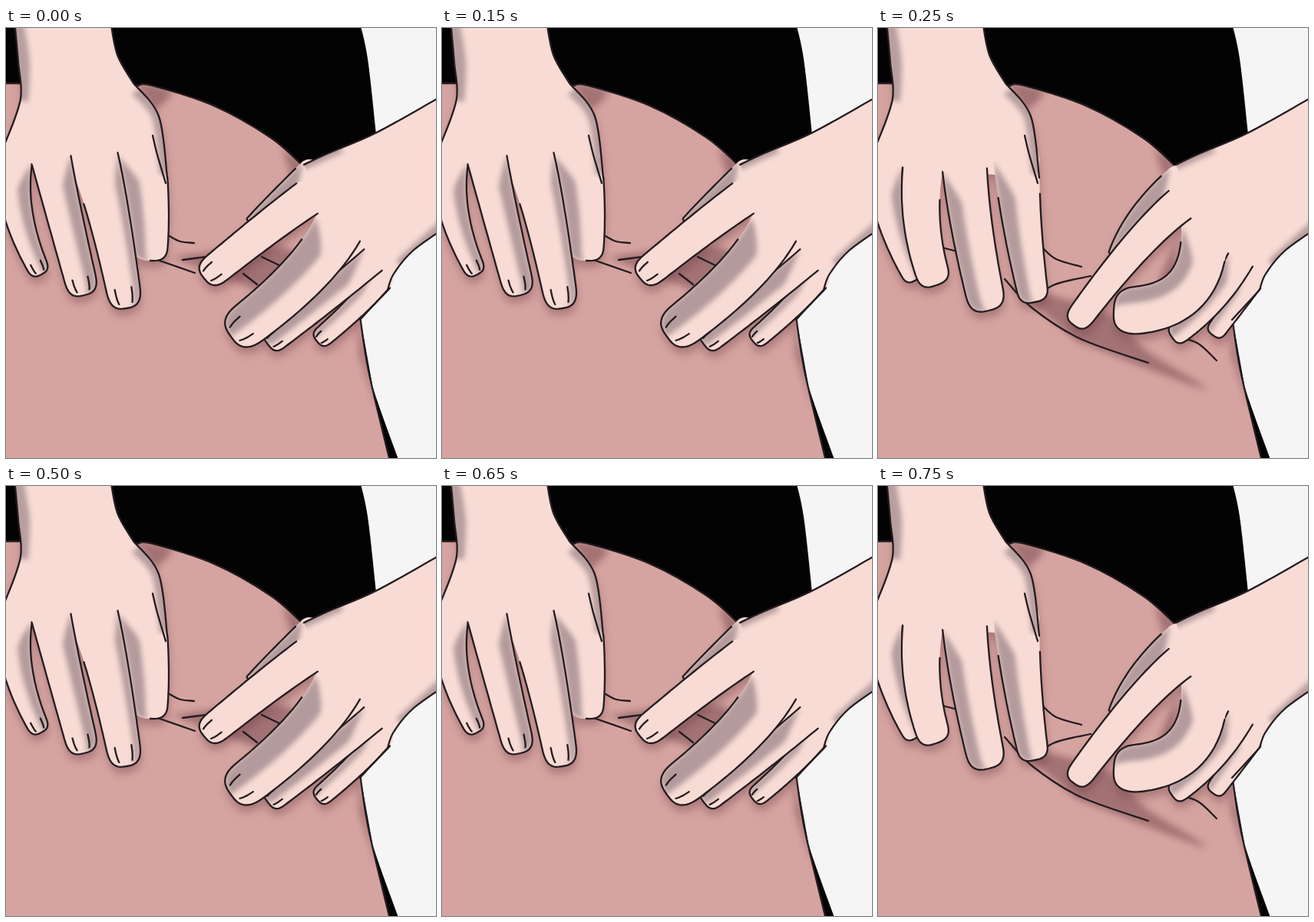
These frames come from a looping animation (560x560 px, 1000 ms). An HTML page:

```html
<!DOCTYPE html>
<html lang="en">
<head>
<meta charset="utf-8">
<title>Skin pinch</title>
<style>
  html, body { margin: 0; width: 100%; height: 100%; overflow: hidden; background: #f5f5f5; }
  svg { display: block; width: 560px; height: 560px; }
  .line { fill: none; stroke: #241c1f; stroke-width: 2.3; stroke-linecap: round; stroke-linejoin: round; }
  .skin { fill: #f7dbd4; }
  .belly { fill: #d6a4a0; }
  .cloth { fill: #030303; }
  .shade { fill: #6b5560; opacity: .48; filter: blur(3px); }
  .rim { fill: none; stroke: #6b5560; stroke-width: 20; opacity: .45; filter: blur(3px); }
  .fold { fill: #64363f; opacity: .45; filter: blur(5px); }
  .cast { fill: #6d3c44; opacity: .4; filter: blur(6px); }
</style>
</head>
<body>
<svg id="stage" viewBox="0 0 560 560"></svg>
<script>
const parse = text => text.trim().split(/\s+/).map(p => p.split(',').map(Number));

// Smooth path through "x,y" points; "|" marks a sharp corner.
function curve(text) {
  let last, d = '';
  for (const part of text.split('|')) {
    const pts = parse(part);
    if (last) pts.unshift(last); else d = 'M' + pts[0];
    for (let i = 0; i < pts.length - 1; i++) {
      const b = pts[i], c = pts[i + 1], a = pts[i - 1] || b, e = pts[i + 2] || c;
      const c1 = b.map((v, k) => v + (c[k] - a[k]) / 6);
      const c2 = c.map((v, k) => v - (e[k] - b[k]) / 6);
      d += `C${c1} ${c2} ${c}`;
    }
    last = pts[pts.length - 1];
  }
  return d;
}
const draw = (cls, d) => `<path class="${cls}" d="${d}"/>`;
const curves = (cls, list = []) => list.map(text => draw(cls, curve(text))).join('');

let clips = 0;
function clipped(d, content) {
  const id = 'clip' + clips++;
  return `<clipPath id="${id}"><path d="${d}"/></clipPath><g clip-path="url(#${id})">${content}</g>`;
}

// Tapered finger along a bend from root through middle to tip.
// shade: shaded share of the width, negative for the other side.
// from: where along the finger each side line begins.
function finger(spine, w0, w1, shade = 0, from = [0, 0]) {
  const [a, m, b] = parse(spine);
  const c = m.map((v, k) => 2 * v - (a[k] + b[k]) / 2);
  const dist = (p, q) => Math.hypot(p[0] - q[0], p[1] - q[1]);
  const round = w1 / 2 / (dist(a, m) + dist(m, b));

  function at(t, side) {
    const [x, y] = a.map((v, k) => (1 - t) ** 2 * v + 2 * t * (1 - t) * c[k] + t * t * b[k]);
    const [dx, dy] = a.map((v, k) => (1 - t) * (c[k] - v) + t * (b[k] - c[k]));
    const s = Math.max(0, 1 - (1 - t) / round);
    const half = (w0 + (w1 - w0) * t) / 2 * Math.cbrt(1 - s ** 3);
    const k = side * half / Math.hypot(dx, dy);
    return [(x - dy * k).toFixed(1), (y + dx * k).toFixed(1)];
  }
  // Steps crowd toward the end, where the tip turns.
  const edge = (side, t0 = 0, t1 = 1, n = 36) => Array.from({ length: n + 1 }, (_, i) =>
    at(t0 + (t1 - t0) * (1 - (1 - i / n) ** 2), typeof side === 'function' ? side(t0 + (t1 - t0) * (1 - (1 - i / n) ** 2)) : side));
  const open = pts => 'M' + pts.join('L');

  const sign = Math.sign(shade);
  const inner = t => sign * (1 - 2 * Math.abs(shade) * Math.min(1, 4 * t));
  const outline = open([...edge(1), ...edge(-1).reverse()]);
  const root = `<circle class="skin" cx="${a[0]}" cy="${a[1]}" r="${w0 / 2}"/>`;
  const band = shade ? clipped(outline, draw('shade', open([...edge(sign), ...edge(inner).reverse()]))) : '';
  const sides = draw('line', open([...edge(1, from[0]), ...edge(-1, from[1]).reverse()]));
  const nail = [-.5, .5].map(k => draw('line', open(edge(k, .9, .975, 4)))).join('');
  return { outline, nail, body: root + draw('skin', outline) + band + sides };
}

const leftPalm = {
  outline: '-10,180 -10,165 0,147 19,92 16,45 11,-10 | 136,-10 | 145,35 166,72 | 199,115 210,195',
  rims: ['13,-5 21,45 19,95', '172,80 200,115 210,190'],
  lines: ['191,140 197,165 208,202']
};
const rightPalm = {
  outline: '461,380 497,341 | 505,320 530,290 575,258 | 575,85 | 560,93 481,137 420,163 388,178',
  rims: ['384,176 435,153', '575,255 515,310'],
  lines: []
};

const open = {
  nails: true,
  folds: ['215,298 345,285 375,300 328,342'],
  creases: ['213,271 227,278 245,280', '230,302 268,297', '170,293 203,304 246,319',
    '333,298 362,312', '309,320 327,334'],
  hands: [{
    palm: leftPalm,
    fingers: [
      finger('176,160 186,235 188,303', 62, 42, .35, [1, .25]),
      finger('10,175 17,246 46,321', 48, 26, -.4),
      finger('115,172 135,250 157,365', 64, 42, -.2, [.35, 0]),
      finger('59,172 77,248 102,348', 52, 40, -.36)
    ]
  }, {
    palm: rightPalm,
    fingers: [
      finger('395,185 350,222 315,251', 28, 6, 1, [.1, 1]),
      finger('488,328 450,368 405,408', 32, 26, .3),
      finger('478,302 410,358 341,412', 36, 32, .6),
      finger('432,262 380,329 293,402', 66, 56, .5, [.25, 0]),
      finger('392,222 333,266 258,326', 48, 40)
    ]
  }]
};

const pinched = {
  folds: ['168,332 215,345 300,372 350,420 425,470 260,408', '390,270 385,325 365,330'],
  creases: ['214,286 232,301 265,311', '165,327 200,364 262,404 352,436',
    '200,358 228,335 277,323', '390,402 417,411 441,433', '84,286 103,291'],
  hands: [{
    palm: leftPalm,
    fingers: [
      finger('180,172 189,265 204,357', 60, 38, .4, [.25, .25]),
      finger('8,182 19,255 48,329', 48, 24, -.35),
      finger('58,185 58,260 76,335', 52, 42, 0, [0, .26]),
      finger('113,185 124,270 144,368', 58, 48, .35)
    ]
  }, {
    palm: rightPalm,
    fingers: [
      finger('390,195 337,243 303,294', 32, 6, 1, [.1, 1]),
      finger('486,330 462,364 436,400', 30, 24, .3),
      finger('472,302 433,358 383,403', 36, 28, .5),
      finger('425,255 398,343 307,368', 60, 62, .34, [.12, .2]),
      finger('393,230 331,291 255,387', 46, 34)
    ]
  }]
};

const belly = curve('-10,72 20,72 | 172,75 | 190,75 270,101 345,143 386,179 |' +
  '461,375 | 472,446 499,560 502,570 | -10,570 | -10,72');

function hand({ palm, fingers }, nails) {
  const d = curve(palm.outline);
  return draw('skin', d) +
    fingers.map(f => f.body + (nails && f !== fingers[0] ? f.nail : '')).join('') +
    clipped(d, curves('rim', palm.rims)) + draw('line', d) + curves('line', palm.lines);
}

function pose({ folds, creases, hands, nails }) {
  const shapes = hands.flatMap(h => [curve(h.palm.outline), ...h.fingers.map(f => f.outline)]);
  const cast = `<g class="cast" transform="translate(1 9)">${shapes.map(d => `<path d="${d}"/>`).join('')}</g>`;
  return `<g class="pose">${clipped(belly, curves('fold', folds) + cast)}` +
    `${curves('line', creases)}${hands.map(h => hand(h, nails)).join('')}</g>`;
}

document.getElementById('stage').innerHTML =
  curves('cloth', ['-10,-10 | 460,-10 | 471,40 482,138 | 440,300 | -10,300', '461,375 | 474,455 511,562 | 495,565']) +
  draw('belly', belly) +
  clipped(belly, curves('fold', ['168,70 215,82 194,108', '360,155 390,178 372,195', '458,375 484,492 460,425'])) +
  draw('line', belly) + pose(open) + pose(pinched);

const poses = document.querySelectorAll('.pose');
function tick() {
  const now = Math.floor(performance.now() / 250) % poses.length;
  poses.forEach((g, i) => g.style.display = i === now ? '' : 'none');
  requestAnimationFrame(tick);
}
tick();
</script>
</body>
</html>
```
